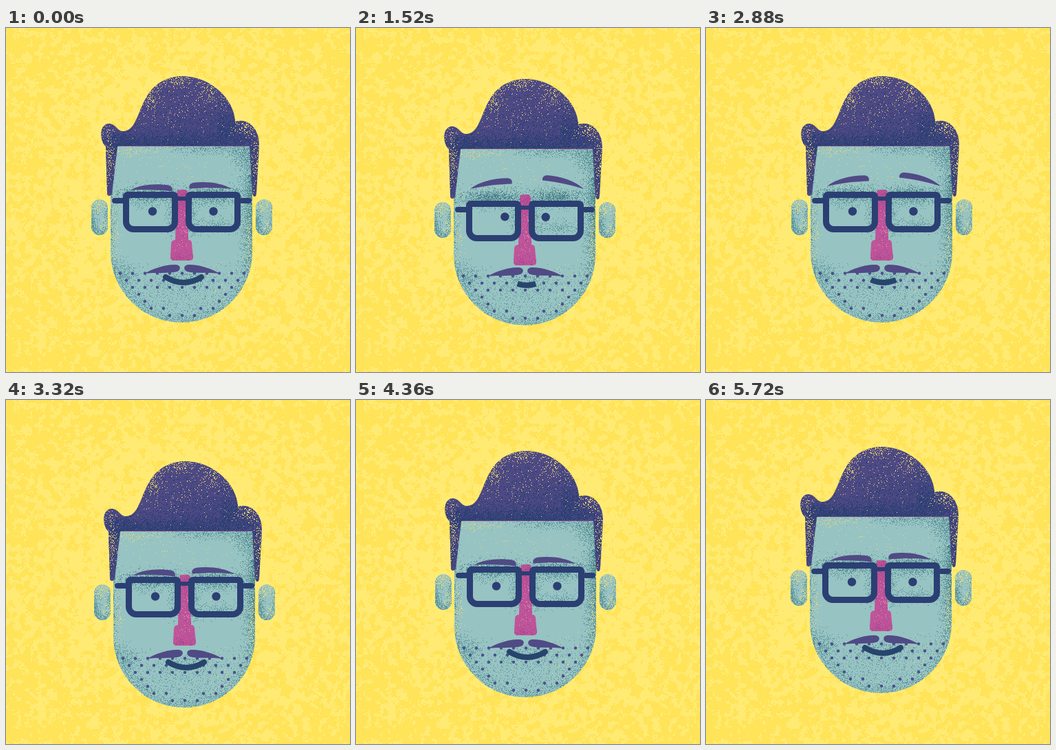
An HTML page with a canvas that plays this animation: 500 by 500 pixels, repeating every 5.76 s.

```html
<!DOCTYPE html>
<html lang="en">
<head>
<meta charset="utf-8">
<title>Nodding face</title>
<style>
html, body { margin: 0; width: 100%; height: 100%; overflow: hidden; background: #ffe967; }
canvas { display: block; width: 500px; height: 500px; }
</style>
</head>
<body>
<canvas id="stage" width="500" height="500"></canvas>
<script>
const SIZE = 500, LOOP = 5760, NOD = 2880, STEP = 40;
const C = {
  skin: '#97c3c3', shade: '#5d9398', deep: '#3f7480', hair: '#504a85', navy: '#2b3f73',
  pink: '#c0559a', plum: '#a4468c', yellow: '#f2dd6c', mouth: '#27446c'
};
const ctx = document.getElementById('stage').getContext('2d');

let seed = 7;
function rand() {
  seed = (seed * 1664525 + 1013904223) >>> 0;
  return seed / 4294967296;
}

function sprite(paint) {
  const c = document.createElement('canvas');
  c.width = c.height = SIZE;
  paint(c.getContext('2d'));
  return c;
}

function fill(g, path, color) {
  g.fillStyle = color;
  g.fill(path);
}

// Grain inside a path; each blob is [x, y, rx, ry, density].
function grain(g, path, color, blobs) {
  g.save();
  g.clip(path);
  g.fillStyle = color;
  for (const [cx, cy, rx, ry, d] of blobs) {
    for (let y = Math.floor(cy - 2 * ry); y < cy + 2 * ry; y++) {
      for (let x = Math.floor(cx - 2 * rx); x < cx + 2 * rx; x++) {
        const u = (x - cx) / rx, v = (y - cy) / ry;
        if (rand() < d * Math.exp(-u * u - v * v)) g.fillRect(x, y, 1, 1);
      }
    }
  }
  g.restore();
}

function pill(x, y, w, h, r) {
  const p = new Path2D();
  p.roundRect(x, y, w, h, r);
  return p;
}

// ---- Still layers ----
function hash(i, j) {
  const s = Math.sin(i * 127.1 + j * 311.7) * 43758.5453;
  return s - Math.floor(s);
}
function noise(x, y) {
  const i = Math.floor(x), j = Math.floor(y), u = x - i, v = y - j;
  const a = hash(i, j) * (1 - u) + hash(i + 1, j) * u;
  const b = hash(i, j + 1) * (1 - u) + hash(i + 1, j + 1) * u;
  return a * (1 - v) + b * v;
}

const backdrop = sprite(g => {
  g.fillStyle = '#ffeb73';
  g.fillRect(0, 0, SIZE, SIZE);
  g.fillStyle = '#ffe358';
  for (let y = 0; y < SIZE; y += 2) {
    for (let x = 0; x < SIZE; x += 2) {
      const far = Math.hypot(x - 250, y - 250) / 350;
      const n = noise(x / 6, y / 6) * 0.75 + rand() * 0.25;
      if (n < 0.16 + far * 0.52) g.fillRect(x, y, 2, 2);
    }
  }
});

const facePath = new Path2D('M152 172H358V325A103 103 0 0 1 152 325Z');
const hairPath = new Path2D(
  'M145 172C136 164 135 142 148 139C160 138 161 151 172 150C192 147 192 112 212 89' +
  'C224 76 240 70 256 70C298 70 332 104 333 136C352 130 368 146 368 170' +
  'L364 240Q364 245 361 245Q359 245 358 240L354 172H162L154 241Q153 244 150 244Q147 244 147 240Z');
const stachePath = new Path2D(
  'M201 357C213 350 230 344 246 344C254 344 255 351 249 354C238 357 216 355 201 357Z');

function drawEar(g, x) {
  const p = pill(x, 249, 24, 52, 12);
  fill(g, p, C.skin);
  grain(g, p, C.shade, [[x, 285, 8, 22, 0.65], [x + 12, 300, 14, 9, 0.6], [x + 23, 278, 5, 22, 0.4]]);
  grain(g, p, C.yellow, [[x + 10, 254, 14, 12, 0.28], [x + 20, 288, 7, 12, 0.2]]);
}

function drawStubble(g) {
  g.fillStyle = '#48508a';
  for (let row = 0; row < 7; row++) {
    const y = 356.5 + row * 10.2;
    for (let x = 166 + (row % 2) * 9; x < 352; x += 18) {
      const r = Math.hypot(x - 255, y - 325);
      if (r > 99 || (row > 2 && r < 85)) continue;
      g.beginPath();
      g.arc(x, y, 2.2, 0, 7);
      g.fill();
    }
  }
}

const head = sprite(g => {
  drawEar(g, 124);
  drawEar(g, 363);

  fill(g, facePath, C.skin);
  const rim = [];
  for (let a = 0.1; a < 3.1; a += 0.12) {
    rim.push([255 + 103 * Math.cos(a), 325 + 103 * Math.sin(a), 12, 12, 0.2]);
  }
  grain(g, facePath, C.shade, [
    ...rim,
    [358, 255, 13, 85, 0.75], [152, 270, 5, 80, 0.3],
    [300, 172, 60, 9, 0.35], [345, 182, 16, 16, 0.5],
    [207, 243, 36, 11, 0.75], [300, 243, 36, 11, 0.75],
    [305, 286, 34, 9, 0.3], [242, 268, 8, 26, 0.35], [270, 268, 8, 26, 0.3],
    [250, 385, 65, 26, 0.13], [172, 358, 16, 14, 0.35], [258, 364, 34, 8, 0.3]
  ]);
  grain(g, facePath, C.deep, [[210, 241, 28, 6, 0.3], [300, 241, 28, 6, 0.3], [357, 240, 5, 60, 0.3]]);
  grain(g, facePath, C.yellow, [
    [185, 178, 35, 8, 0.14], [157, 300, 6, 40, 0.12], [355, 310, 6, 45, 0.15],
    [320, 380, 35, 35, 0.03], [250, 215, 80, 30, 0.015]
  ]);
  drawStubble(g);

  fill(g, hairPath, C.hair);
  grain(g, hairPath, C.navy, [
    [250, 172, 95, 20, 0.85], [170, 168, 28, 16, 0.7], [322, 150, 20, 32, 0.6],
    [265, 130, 70, 40, 0.25], [150, 215, 8, 30, 0.45], [361, 215, 8, 35, 0.5], [350, 165, 16, 16, 0.3]
  ]);
  grain(g, hairPath, C.yellow, [
    [205, 98, 14, 20, 0.2], [245, 75, 35, 9, 0.2], [305, 92, 24, 18, 0.13],
    [350, 145, 18, 11, 0.2], [146, 152, 10, 14, 0.1], [149, 188, 7, 22, 0.22],
    [363, 200, 7, 30, 0.2], [250, 115, 60, 30, 0.025]
  ]);
  g.fillStyle = 'rgba(170,80,140,0.55)';
  g.fillRect(163, 171, 190, 1);
});

const nose = sprite(g => {
  const p = new Path2D(
    'M252 235H260Q264 235 264 241L265 308Q270 308 270 313L272 333Q272 338 267 338H244' +
    'Q239 338 239 333L240 314Q240 308 246 308L248 241Q248 235 252 235Z');
  fill(g, p, C.pink);
  grain(g, p, C.plum, [[256, 250, 12, 22, 0.4], [256, 334, 20, 8, 0.4], [256, 300, 10, 20, 0.15]]);
  grain(g, p, '#dba3bd', [[258, 292, 9, 25, 0.06]]);
});

// ---- Motion ----
// Smooth path through [time, value] keys that wraps around.
function cyclic(keys, period) {
  const n = keys.length;
  const at = i => {
    const w = Math.floor(i / n), k = keys[i - w * n];
    return [k[0] + w * period, k[1]];
  };
  return time => {
    const t = time % period;
    let i = n - 1;
    while (keys[i][0] > t) i--;
    const [a, b, c, d] = [at(i - 1), at(i), at(i + 1), at(i + 2)];
    const len = c[0] - b[0], u = (t - b[0]) / len;
    const m1 = (c[1] - a[1]) / (c[0] - a[0]) * len;
    const m2 = (d[1] - b[1]) / (d[0] - b[0]) * len;
    const u2 = u * u, u3 = u2 * u;
    return (2 * u3 - 3 * u2 + 1) * b[1] + (u3 - 2 * u2 + u) * m1 +
           (3 * u2 - 2 * u3) * c[1] + (u3 - u2) * m2;
  };
}

// Holds and eased changes between keys.
function eased(keys) {
  return t => {
    let i = keys.length - 1;
    while (keys[i][0] > t) i--;
    const [t0, v0] = keys[i];
    if (i === keys.length - 1) return v0;
    const [t1, v1] = keys[i + 1], u = (t - t0) / (t1 - t0);
    return v0 + (v1 - v0) * u * u * (3 - 2 * u);
  };
}

const headX = cyclic([
  [0, 0], [280, 3], [560, 4.4], [920, 0], [1200, -5], [1340, -7.5], [1640, -10.5],
  [1840, -10.5], [2080, -8], [2280, -7.4], [2520, -6.7], [2840, -1]
], NOD);
const headY = cyclic([
  [0, 0], [200, 11], [400, 20], [520, 15], [660, 6], [800, 4], [920, 6], [1040, 13],
  [1160, 18], [1280, 13], [1420, 5], [1560, 4], [1700, 8], [1840, 17.5], [1920, 18.5],
  [2000, 9], [2080, 2], [2120, 0], [2300, -5], [2480, -7.5], [2680, -6], [2840, -2]
], NOD);
const slip = eased([[0, 0], [200, 0], [480, 4], [940, 4], [1240, 9], [1700, 9], [2000, 14.5], [2240, 14.5], [2640, 0]]);
const spread = eased([[0, 0], [300, 0], [700, 0.55], [1100, 0.6], [1500, 1], [2920, 1], [3320, 0]]);
const lift = eased([[0, 0], [1000, 0], [1500, 1], [2920, 1], [3320, 0]]);
const cross = eased([[0, 0], [1240, 0], [1560, 1], [2300, 1], [2600, 0]]);
const smile = eased([[0, 26], [1200, 26], [1640, 10.5], [2600, 10.5], [3160, 26]]);

// ---- Moving parts ----
const browPath = new Path2D('M0 0C15 -8 38 -9 57 -5Q64 -2 61 4C44 1 20 -1 0 0Z');

function drawBrow(x, y, angle, side) {
  ctx.save();
  ctx.translate(x, y);
  ctx.scale(side, 1);
  ctx.rotate(angle);
  fill(ctx, browPath, C.hair);
  ctx.restore();
}

function drawPupil(x, y) {
  ctx.fillStyle = C.navy;
  ctx.beginPath();
  ctx.arc(x, y, 6.2, 0, 7);
  ctx.fill();
}

function drawMouth(half) {
  const rise = 8 * (half / 26) ** 2;
  ctx.lineCap = half > 21 ? 'round' : 'butt';
  ctx.lineWidth = 8;
  ctx.strokeStyle = C.mouth;
  ctx.beginPath();
  ctx.moveTo(258 - half, 370 - rise);
  ctx.quadraticCurveTo(258, 370 + rise, 258 + half, 370 - rise);
  ctx.stroke();
}

function line(x1, x2, y, width) {
  ctx.lineWidth = width;
  ctx.beginPath();
  ctx.moveTo(x1, y);
  ctx.lineTo(x2, y);
  ctx.stroke();
}

function drawGlasses(dy) {
  ctx.save();
  ctx.translate(0, dy);
  ctx.strokeStyle = C.navy;
  ctx.lineCap = 'round';
  line(158, 172, 251, 8);
  line(343, 353, 251, 8);
  line(248, 263, 248, 6);
  ctx.lineWidth = 9;
  for (const x of [174.5, 265.5]) ctx.stroke(pill(x, 242.5, 71, 50, [2, 2, 11, 11]));
  ctx.restore();
}

function drawStache() {
  fill(ctx, stachePath, C.hair);
  ctx.save();
  ctx.translate(512, 0);
  ctx.scale(-1, 1);
  fill(ctx, stachePath, C.hair);
  ctx.restore();
}

function draw(t) {
  const s = spread(t), l = lift(t), c = cross(t);
  ctx.drawImage(backdrop, 0, 0);
  ctx.save();
  ctx.translate(Math.round(headX(t)), Math.round(headY(t)));
  ctx.drawImage(head, 0, 0);
  drawPupil(213 + 14 * c, 266.5 + 4 * c);
  drawPupil(301.5 - 16.5 * c, 266.5 + 4.5 * c);
  drawBrow(180 - 4 * l, 236 + 2 * s - 8 * l, -0.04 - 0.06 * s - 0.09 * l, 1);
  drawBrow(328 + 13 * s, 234 + 2 * s - 6 * l, -0.07 - 0.05 * s - 0.15 * l, -1);
  ctx.drawImage(nose, 0, Math.round(3 * c));
  drawMouth(smile(t));
  drawStache();
  drawGlasses(slip(t));
  ctx.restore();
}

const start = performance.now();
function tick() {
  const t = (performance.now() - start) % LOOP;
  draw(Math.floor(t / STEP) * STEP);
  requestAnimationFrame(tick);
}
tick();
</script>
</body>
</html>
```
